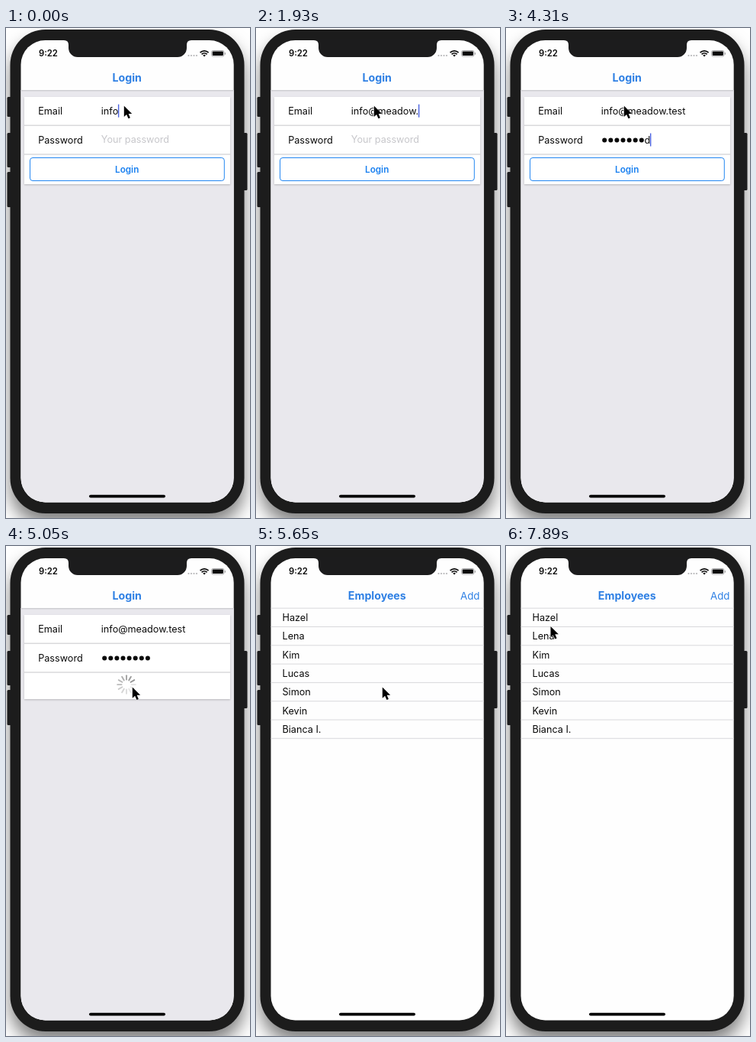
Animation of 320x640 px, one loop 8000 ms. Source, as an HTML page:

```html
<!DOCTYPE html>
<html lang="en">
<head>
<meta charset="utf-8">
<title>Login and employee list</title>
<style>
html, body { margin: 0; width: 100%; height: 100%; overflow: hidden; background: #fff; }
svg { display: block; width: 320px; height: 640px; }
text { font: 12.65px Inter, "Liberation Sans", sans-serif; fill: #0a0a0a; white-space: pre; }
.title { font-size: 14.2px; font-weight: 700; fill: #2f80e4; text-anchor: middle; }
.button { font-size: 11.7px; font-weight: 600; fill: #1a80f0; text-anchor: middle; }
.add { font-size: 13.3px; fill: #2f80e4; }
.clock { font-size: 11.3px; font-weight: 600; }
.hint { fill: #c7c7cb; }
.rule { stroke: #d9d9dc; fill: none; }
</style>
</head>
<body>
<svg viewBox="0 0 320 640" xmlns="http://www.w3.org/2000/svg">
  <defs>
    <filter id="bodyShadow" x="-30%" y="-20%" width="160%" height="140%">
      <feDropShadow dx="0" dy="14" stdDeviation="11" flood-color="#000" flood-opacity=".5"/>
    </filter>
    <filter id="cardShadow" x="-5%" y="-10%" width="110%" height="125%">
      <feDropShadow dx="0" dy="1" stdDeviation="1" flood-color="#000" flood-opacity=".22"/>
    </filter>
    <clipPath id="screen"><rect x="19.5" y="16" width="279.2" height="603.5" rx="32"/></clipPath>
  </defs>

  <rect width="320" height="640" fill="#fff"/>
  <g fill="#1c1c1d">
    <rect x="5.5" y="2" width="307" height="632" rx="46" filter="url(#bodyShadow)"/>
    <rect x="1.5" y="90" width="6" height="26" rx="1.5"/>
    <rect x="1.5" y="137" width="6" height="45" rx="1.5"/>
    <rect x="1.5" y="188" width="6" height="46" rx="1.5"/>
    <rect x="311" y="137" width="5.5" height="75" rx="1.5"/>
  </g>

  <g clip-path="url(#screen)">
    <rect x="19" y="16" width="281" height="604" fill="#fefefe"/>

    <g id="login">
      <rect x="19" y="81" width="281" height="540" fill="#e9e8ed"/>
      <rect x="19" y="81" width="281" height="1.5" fill="#cfcfd3"/>
      <text class="title" x="158.7" y="70.2">Login</text>
      <rect id="card" x="24" y="90" width="270" height="114" fill="#fff" filter="url(#cardShadow)"/>
      <path class="rule" stroke-width="1.4" d="M24 127.2H294M24 165H294"/>
      <text x="42.2" y="113">Email</text>
      <text x="42.2" y="150.8">Password</text>
      <text id="email" x="124.8" y="113.2"></text>
      <text id="hint" class="hint" x="124.8" y="150.2">Your password</text>
      <g id="dots"></g>
      <text id="lastKey" y="150.8"></text>
      <rect id="caret" width="1.4" height="17" fill="#4a62e0"/>
      <g id="button">
        <rect x="31.5" y="169.5" width="254.8" height="30" rx="3.5" fill="#fff" stroke="#2286f2"/>
        <text class="button" x="158.7" y="188.7">Login</text>
      </g>
      <g id="spinner" transform="translate(158 181)" stroke-width="2" stroke-linecap="round"></g>
    </g>

    <g id="staff">
      <path class="rule" d="M19 81.2H300"/>
      <text class="title" x="158.8" y="70.2">Employees</text>
      <text class="add" x="268" y="70">Add</text>
      <g id="rows"></g>
    </g>
  </g>

  <path fill="#1c1c1d" d="M76 15H243V16Q237 16 237 22V26a12 12 0 0 1-12 12H94a12 12 0 0 1-12-12V22Q82 16 76 16Z"/>
  <text class="clock" x="43" y="37">9:22</text>
  <g fill="#b4b4b6">
    <circle cx="239.5" cy="36" r="1.1"/><circle cx="243" cy="36" r="1.1"/>
    <circle cx="246.5" cy="36" r="1.1"/><circle cx="250" cy="36" r="1.1"/>
  </g>
  <g fill="none" stroke="#0a0a0a" stroke-width="1.7">
    <path d="M254.6 32.2a7.8 7.8 0 0 1 11 0M256.6 34.3a5 5 0 0 1 7 0"/>
    <path d="M258.3 35.7a2.5 2.5 0 0 1 3.6 0L260.1 37.6Z" fill="#0a0a0a" stroke="none"/>
  </g>
  <rect x="269.6" y="29.5" width="16.4" height="7.6" rx="2" fill="none" stroke="#9b9b9d" stroke-width=".8"/>
  <rect x="270.7" y="30.6" width="14.2" height="5.4" rx="1" fill="#0a0a0a"/>
  <rect x="286.8" y="32" width="1.1" height="2.7" rx=".5" fill="#9b9b9d"/>
  <rect x="109" y="609.7" width="100" height="3.8" rx="1.9" fill="#000"/>

  <path id="mouse" d="M0 0V14.2L3.3 11.2L5.7 16.5L8.1 15.4L5.8 10.3H10.4Z"
        fill="#000" stroke="#fff" stroke-width="1" paint-order="stroke"/>
</svg>

<script>
const LOOP = 8000;
const EMAIL = "info@meadow.test";
const PASSWORD = "password";
const STAFF = ["Hazel", "Lena", "Kim", "Lucas", "Simon", "Kevin", "Bianca I."];
const FIELD_X = 124.8, DOT_GAP = 8.1, ROW = 24.3;
const SUBMIT = 4750, SIGNED_IN = 5200, LOADED = 5650;
const FOCUS_PASSWORD = 2530;

// [time, number of characters]
const emailKeys = [[0, 4], [450, 5], [890, 6], [1190, 7], [1340, 9], [1640, 10],
  [1790, 11], [1930, 12], [2080, 13], [2230, 14], [2380, 16]];
const passwordKeys = [[0, 0], [2980, 1], [3130, 2], [3270, 3], [3420, 4],
  [3720, 5], [3870, 6], [4020, 7], [4170, 8]];
// [time, x, y]
const mousePath = [[0, 154.8, 101.8], [4320, 157, 118], [4470, 162, 156], [4620, 165.8, 184.5],
  [6250, 148, 207], [6400, 108, 246], [6550, 70, 250], [6700, 54.8, 230.5],
  [6850, 50, 165], [7000, 62, 88], [7140, 100, 46], [7290, 136, 82],
  [7440, 122, 118], [7590, 92, 122], [7740, 68, 110], [7890, 58.5, 105]];

const $ = id => document.getElementById(id);
const at = (keys, t) => keys.filter(k => k[0] <= t).pop();
const show = (el, on) => el.setAttribute("display", on ? "inline" : "none");

function add(parent, tag, attrs, label = "") {
  const el = document.createElementNS("http://www.w3.org/2000/svg", tag);
  for (const name in attrs) el.setAttribute(name, attrs[name]);
  el.textContent = label;
  return parent.appendChild(el);
}

STAFF.forEach((name, i) => {
  add($("rows"), "text", { x: 34.5, y: 98 + i * ROW }, name);
  add($("rows"), "path", { class: "rule", d: `M19 ${81.2 + (i + 1) * ROW}H300` });
});
const dots = [...PASSWORD].map((_, i) =>
  add($("dots"), "circle", { cx: 129.2 + i * DOT_GAP, cy: 146.5, r: 3, fill: "#0a0a0a" }));
const bars = Array.from({ length: 12 }, (_, i) =>
  add($("spinner"), "path", { d: "M0 -6.5V-11.8", transform: `rotate(${i * 30})` }));

function drawFields(t) {
  $("email").textContent = EMAIL.slice(0, at(emailKeys, t)[1]);
  const [typedAt, count] = at(passwordKeys, t);
  const revealed = count > 0 && t < typedAt + (count === PASSWORD.length ? 150 : 600);
  const hidden = count - (revealed ? 1 : 0);
  dots.forEach((dot, i) => show(dot, i < hidden));
  show($("hint"), count === 0);

  const key = $("lastKey");
  key.textContent = revealed ? PASSWORD[count - 1] : "";
  key.setAttribute("x", FIELD_X + hidden * DOT_GAP);

  const inPassword = t >= FOCUS_PASSWORD;
  const width = inPassword
    ? hidden * DOT_GAP + (revealed ? key.getComputedTextLength() : 0)
    : $("email").getComputedTextLength();
  $("caret").setAttribute("x", FIELD_X + width - 0.3);
  $("caret").setAttribute("y", inPassword ? 137.5 : 99.7);
  show($("caret"), t < SUBMIT);
}

function drawSpinner(t) {
  const head = 2 + 2 * Math.floor((t - 5050) / 150);
  bars.forEach((bar, i) => {
    const age = ((head - i) % 12 + 12) % 12;
    const grey = 150 + Math.min(age, 9) * 9;
    bar.setAttribute("stroke", `rgb(${grey},${grey},${grey})`);
  });
}

function draw(t) {
  const signedIn = t >= SIGNED_IN, busy = t >= SUBMIT;
  show($("login"), !signedIn);
  show($("staff"), signedIn);
  show($("rows"), t >= LOADED);
  if (!signedIn) {
    drawFields(t);
    show($("button"), !busy);
    show($("spinner"), busy);
    $("card").setAttribute("height", busy ? 110 : 114);
    if (busy) drawSpinner(t);
  }
  const [, x, y] = at(mousePath, t);
  $("mouse").setAttribute("transform", `translate(${x} ${y})`);
}

const start = performance.now();
function tick() {
  draw((performance.now() - start) % LOOP);
  requestAnimationFrame(tick);
}
tick();
</script>
</body>
</html>
```
